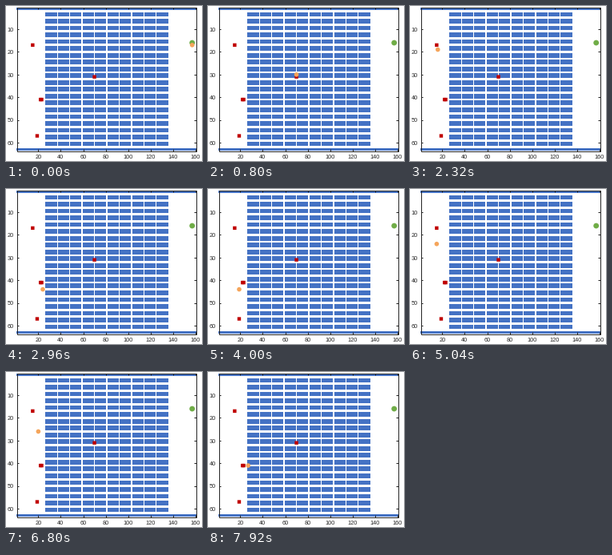
Animation of 245x194 px, one loop 8 s. Source, as a matplotlib script:

```python
import matplotlib.pyplot as plt
from matplotlib.animation import FuncAnimation
from matplotlib.patches import Circle, Rectangle

W, H, DPI = 245, 194, 100
COLS, ROWS = 160, 63
CELL_W, CELL_H = 1.40375, 179 / ROWS
CELLS_PER_FRAME = 10
FRAMES, INTERVAL = 100, 80

BLUE, RED, GREEN, ORANGE = "#4472C4", "#C00000", "#70AD47", "#F5A55B"
INK = "#262626"


def px(col):
    return 13 + (col - 0.5) * CELL_W


def py(row):
    return 2 + (row - 0.5) * CELL_H


# Stops and the routes between them; integers in a route are waits.
A, C, D, E = (15, 18), (24, 41), (19, 56), (70, 32)
A_TO_C = [(15, 19), (20, 19), (20, 38), (24, 38), C]
C_TO_A = A_TO_C[-2::-1] + [A]
D_TO_A = [(19, 44), (15, 44), A]
E_TO_D = [(70, 35), (19, 35), D]

ROUTE = [
    (157, 17), (70, 17), *E_TO_D, 3,
    *D_TO_A, 3, *A_TO_C, 3, *C_TO_A, 3, *A_TO_C, 3,
    (24, 44), (19, 44), D, 3,
    (19, 44), (70, 44), E, 9,
    *E_TO_D, 2, *D_TO_A, 2,
    (16, 18), (16, 17), (26, 17), (26, 41), C, 8,
    (24, 38), (20, 38), (20, 24), (15, 24), A, 2,
    (15, 19), (20, 19), (20, 29), (59, 29), (59, 32), E,
    (37, 32), (37, 44), (19, 44), D, 2,
    *D_TO_A, 3, (15, 19), 8, *A_TO_C[1:], 11,
    (37, 41), (37, 32), E, 3, (37, 32), (37, 41), C,
]


def walk(route):
    """Expand a route into one cell per tick."""
    cells = [route[0]]
    for item in route[1:]:
        if isinstance(item, int):
            cells += [cells[-1]] * item
            continue
        (x, y), (tx, ty) = cells[-1], item
        while (x, y) != (tx, ty):
            if x != tx:
                x += 1 if tx > x else -1
            else:
                y += 1 if ty > y else -1
            cells.append((x, y))
    return cells


cells = walk(ROUTE)

fig = plt.figure(figsize=(W / DPI, H / DPI), dpi=DPI, facecolor="white")
ax = fig.add_axes([0, 0, 1, 1])
ax.set_xlim(0, W)
ax.set_ylim(H, 0)
ax.axis("off")


def block(col, row, width, height):
    """Fill a group of grid cells."""
    ax.add_patch(Rectangle((px(col - 0.5), py(row - 0.5)), width * CELL_W,
                           height * CELL_H, color=BLUE, lw=0))


def line(x0, y0, x1, y1):
    ax.plot([x0, x1], [y0, y1], color=INK, lw=0.72, zorder=3,
            solid_capstyle="butt")


block(1, 1, COLS, 1)
block(1, ROWS, COLS, 1)
for i in range(10):
    for j in range(20):
        block(27 + 11 * i, 3 + 3 * j, 10, 2)

left, right, top, bottom = 13.5, 237.5, 1.5, 181.5
ax.add_patch(Rectangle((left, top), right - left, bottom - top, fill=False,
                       ec=INK, lw=0.72, zorder=3))

tick = 2.5
font = dict(family="Liberation Sans", size=7.4 * 72 / DPI, color=INK)
for col in range(20, 161, 20):
    x = px(col)
    line(x, bottom, x, bottom - tick)
    line(x, top, x, top + tick)
    ax.text(x, 188.7, str(col), ha="center", va="center_baseline", **font)
for row in range(10, 61, 10):
    y = py(row)
    line(left, y, left + tick, y)
    line(right, y, right - tick, y)
    ax.text(10, y + 0.2, str(row), ha="right", va="center_baseline", **font)

side = 4.4
for col, row in [(15, 17), (70, 31), (22, 41), (23, 41), (19, 57)]:
    ax.add_patch(Rectangle((px(col) - side / 2, py(row) - side / 2), side, side,
                           color=RED, lw=0, snap=False, zorder=4))
ax.add_patch(Circle((px(157), py(16)), 3.4, color=GREEN, lw=0, zorder=4))
robot = ax.add_patch(Circle((0, 0), 2.8, color=ORANGE, lw=0, zorder=5))


def update(frame):
    col, row = cells[frame * CELLS_PER_FRAME]
    robot.center = px(col), py(row)
    return [robot]


anim = FuncAnimation(fig, update, frames=FRAMES, interval=INTERVAL,
                     repeat=True, repeat_delay=0)
plt.show()
```
